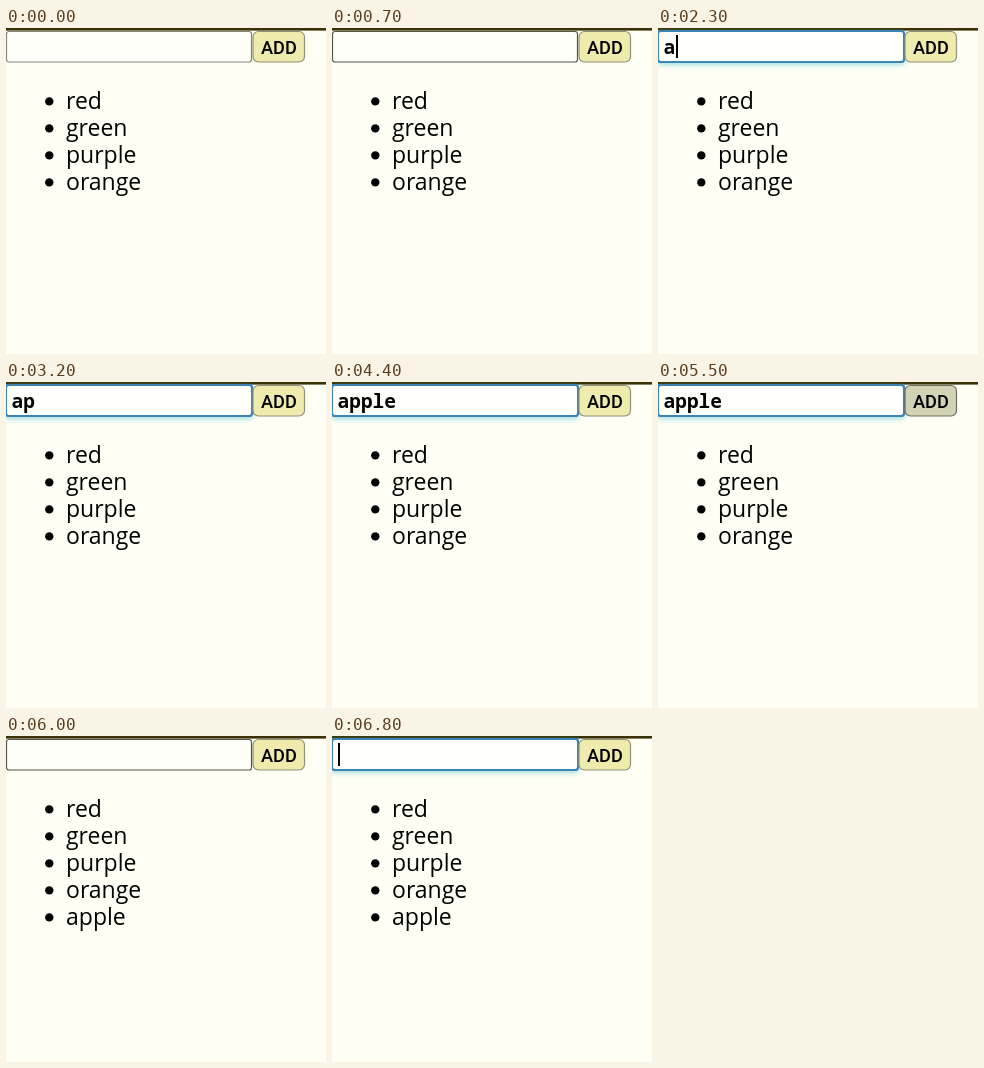
Recreate the animation shown at these times as an HTML page with a canvas. Size 320 by 326 pixels, loop 8000 ms.

```html
<!DOCTYPE html>
<html lang="en">
<head>
<meta charset="utf-8">
<title>Word list</title>
<style>
html, body { margin: 0; width: 100%; height: 100%; overflow: hidden; background: #fffff5; }
canvas { display: block; }
</style>
</head>
<body>
<canvas id="stage" width="320" height="326"></canvas>
<script>
const ctx = document.getElementById('stage').getContext('2d');
const LOOP = 8000;
const WORDS = ['red', 'green', 'purple', 'orange'];
const LIST_FONT = '500 23px "Open Sans", "Noto Sans", sans-serif';
const INPUT_FONT = '600 19.5px "Noto Sans Mono", monospace';
const BUTTON_FONT = '500 18.2px Roboto, sans-serif';

// Each list holds [start time, value], the last one reached applies.
const TYPED = [[0, ''], [2000, 'a'], [2700, 'ap'], [3900, 'app'],
  [4100, 'appl'], [4300, 'apple'], [5800, '']];
const CARET = [[0, false], [1700, true], [2600, false], [2700, true],
  [3200, false], [3900, true], [4400, false], [6800, true]];
const FIELD = [[0, 'normal'], [600, 'hover'], [1600, 'focus'], [5600, 'normal'],
  [6000, 'hover'], [6800, 'focus']];
const BUTTON = [[0, 'normal'], [5500, 'hover'], [5600, 'active'], [5800, 'hover'], [6000, 'normal']];

const FIELD_BORDER = { normal: '#85857b', hover: '#55554a', focus: '#3c84b4' };
const BUTTON_LOOK = {
  normal: ['#eeebad', '#91917b'],
  hover: ['#d4d2b5', '#6b6b61'],
  active: ['#b3b3a9', '#4c4c48']
};

function at(track, t) {
  let value = track[0][1];
  for (const [start, v] of track) if (t >= start) value = v;
  return value;
}

function box(x, y, w, h, r, fill, stroke, line) {
  ctx.beginPath();
  ctx.roundRect(x, y, w, h, r);
  ctx.fillStyle = fill;
  ctx.fill();
  ctx.strokeStyle = stroke;
  ctx.lineWidth = line;
  ctx.stroke();
}

function label(text, x, y, font) {
  ctx.font = font;
  ctx.fillStyle = '#000';
  ctx.fillText(text, x, y);
}

function drawField(t) {
  const state = at(FIELD, t);
  const text = at(TYPED, t);
  if (state === 'focus') {
    ctx.save();
    ctx.shadowColor = 'rgba(110, 205, 215, 0.55)';
    ctx.shadowBlur = 5;
    ctx.shadowOffsetY = 2;
    box(0, 3, 246, 31, 3, '#fffffb', FIELD_BORDER.focus, 2);
    ctx.restore();
    box(0, 3, 246, 31, 3, '#fffffb', FIELD_BORDER.focus, 2);
  } else {
    box(0.5, 3.5, 245, 30.5, 2.5, '#fffff9', FIELD_BORDER[state], 1.2);
  }
  label(text, 5.5, 26, INPUT_FONT);
  if (at(CARET, t)) ctx.fillRect(Math.round(6 + ctx.measureText(text).width), 7, 2, 23);
}

function drawButton(t) {
  const [fill, border] = BUTTON_LOOK[at(BUTTON, t)];
  box(247, 3.5, 51.5, 30.5, 5.5, fill, border, 1.2);
  label('ADD', 255, 25.5, BUTTON_FONT);
}

function drawList(t) {
  const items = t >= 5800 ? [...WORDS, 'apple'] : WORDS;
  items.forEach((word, i) => {
    const y = 81 + i * 27;
    label(word, 60, y, LIST_FONT);
    ctx.beginPath();
    ctx.arc(43.3, y - 7.6, 4.2, 0, Math.PI * 2);
    ctx.fill();
  });
}

const origin = performance.now();

function draw() {
  const t = (performance.now() - origin) % LOOP;
  ctx.fillStyle = '#fffff5';
  ctx.fillRect(0, 0, 320, 326);
  ctx.fillStyle = '#3a3206';
  ctx.fillRect(0, 0, 320, 2.6);
  drawField(t);
  drawButton(t);
  drawList(t);
  requestAnimationFrame(draw);
}

draw();
</script>
</body>
</html>
```
